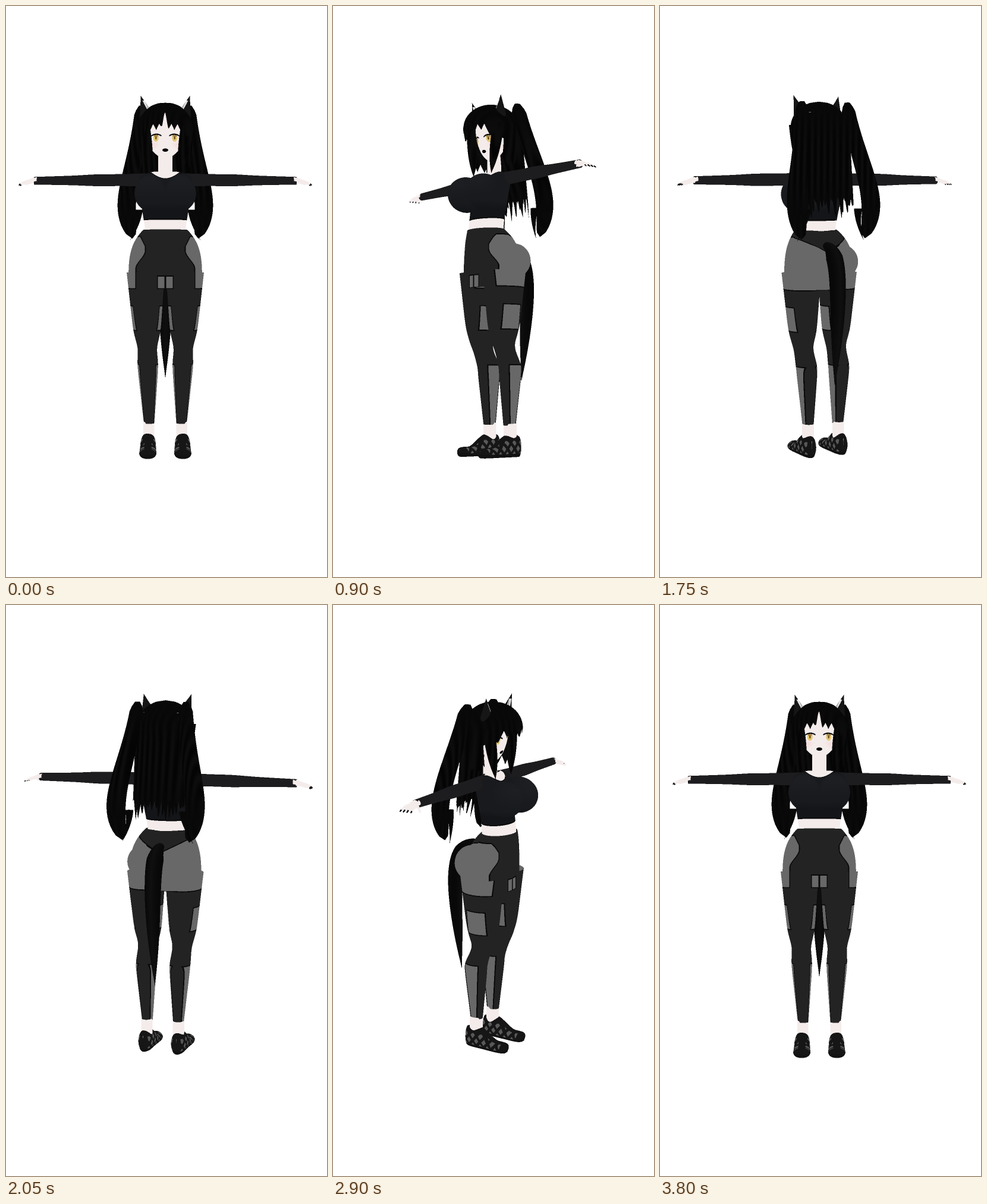
Recreate the animation shown at these times as an HTML page with a canvas. Size 540 by 960 pixels, loop 4150 ms.

```html
<!DOCTYPE html>
<html lang="en">
<head>
<meta charset="utf-8">
<title>Turntable</title>
<style>
html, body { margin: 0; width: 100%; height: 100%; overflow: hidden; background: #fff; }
canvas { display: block; width: 540px; height: 960px; }
</style>
</head>
<body>
<canvas id="stage" width="540" height="960"></canvas>
<script>
const LOOP = 4150, STEP = 60, LAST = 63;
const SS = 2, TOP = 140, W = 540 * SS, H = 630 * SS;
const PIVOT_X = 268, PIVOT_Y = 455, CAMERA = 2100, SIDES = 28;

// ---------- helpers ----------
const { abs, min, max, floor, sin, cos, sqrt, exp, hypot, PI } = Math;
const rgb = (r, g, b) => (255 << 24 | b << 16 | g << 8 | r) >>> 0;
const grey = v => rgb(v, v, v);
const mix = (a, b, t) => a + (b - a) * t;
const clamp01 = v => max(0, min(1, v));
const smooth = v => { const t = clamp01(v); return t * t * (3 - 2 * t); };
const bump = (t, centre, width) => exp(-(((t - centre) / width) ** 2));
const band = (v, lo, hi) => min(v - lo, hi - v);
const zigzag = (v, period) => abs(((v / period) % 1 + 1) % 1 * 2 - 1);

// ---------- model: shape(t) gives [x, y, z, radiusA, radiusB] for t from 0 to 1 ----------
const parts = [];
const RINGS = {
  y: [[1, 0, 0], [0, 0, 1]],
  x: [[0, 1, 0], [0, 0, 1]],
  z: [[1, 0, 0], [0, 1, 0]]
};

// Ring plane that follows a curve lying in the y-z plane.
function bentRing(shape, t) {
  const p = shape(max(0, t - .02)), q = shape(min(1, t + .02));
  const dy = q[1] - p[1], dz = q[2] - p[2], len = hypot(dy, dz);
  return [[1, 0, 0], [0, -dz / len, dy / len]];
}

function tube(axis, shape, paint, { side = 1, floorY = 999, steps = 30 } = {}) {
  const mesh = [];
  for (let i = 0; i <= steps; i++) {
    const t = i / steps, [x, y, z, ra, rb] = shape(t);
    const [A, B] = RINGS[axis] || bentRing(shape, t);
    for (let j = 0; j <= SIDES; j++) {
      const a = j / SIDES * 2 * PI, u = max(.3, ra) * cos(a), v = max(.3, rb) * sin(a);
      mesh.push(side * (x + A[0] * u + B[0] * v), min(floorY, y + A[1] * u + B[1] * v), z + A[2] * u + B[2] * v);
    }
  }
  parts.push({ mesh: Float32Array.from(mesh), steps, paint });
}

function pair(axis, shape, paint, options = {}) {
  for (const side of [-1, 1]) tube(axis, shape, paint, { ...options, side });
}

const ball = (x, y, z, rx, ry, rz) => t =>
  [x, y - ry * cos(t * PI), z, rx * sin(t * PI), rz * sin(t * PI)];

// ---------- surfaces ----------
const SKIN = rgb(244, 236, 235), BLACK = grey(10), PANEL = grey(104), LEGGING = grey(35);
const skin = () => SKIN;
const sleeve = () => rgb(29, 29, 32);
const finger = x => abs(x) > 243.5 ? grey(15) : SKIN;

const hair = (x, y, z) => grey(floor(9 + 5 * sin(x * .55 + z * .3) * sin(y * .018)));
const tailFur = x => grey(floor(8 + 8 * clamp01(1 - abs(x) / 12)));

const fringe = x => 214 - 20 * bump(x, -1, 4) - 10 * zigzag(x, 10) + 14 * clamp01((abs(x) - 30) / 8);

function cap(x, y, z) {
  if (z > 10 && y > fringe(x)) return 0;
  if (y > 258 + 14 * zigzag(z, 14)) return 0;
  return hair(x, y, z);
}

const backHair = (x, y, z) => y > 322 + 34 * zigzag(x + 3, 13) * abs(sin(x * .3)) ? 0 : hair(x, y, z);

function face(x, y, z) {
  const ax = abs(x), ex = ax - 15.5, lid = 218 + ex * ex * .035;
  if (z < -10) return SKIN;
  if (hypot(x / 5, (y - 244) / 2.6) < 1) return grey(8);
  if (abs(ex) < 9 && abs(y - lid) < 1.1) return grey(14);
  if (y > lid && hypot(ex / 4.3, (y - 224) / 6) < 1) {
    if (hypot(ex / 1.4, (y - 224) / 2.5) < 1) return rgb(110, 84, 36);
    return y < 222 ? rgb(176, 138, 66) : rgb(230, 198, 112);
  }
  const blush = 16 * clamp01(1 - hypot((ax - 20) / 11, (y - 235) / 7));
  return rgb(244, floor(236 - blush), floor(235 - blush));
}

function ear(x, y, z) {
  const ax = abs(x), rim = 39 - (y - 160) * .55;
  if (z < 11 || min(band(y, 161, 190), band(ax, rim - 10, rim)) < 0) return grey(22);
  return grey(floor(205 + 35 * sin(ax * 1.3 + y * .5)));
}

const cloth = (x, y, z) => {
  const v = floor(25 + 5 * clamp01((z - 20) / 40) * clamp01((330 - y) / 30) - 5 * clamp01((y - 335) / 12));
  return rgb(v, v + 1, v + 4);
};

function torso(x, y, z) {
  const collar = z > 0 ? max(280, 291 - x * x * .02) : 278;
  if (y < collar || y > 361) return SKIN;
  if (y > 359 || y < collar + 1) return BLACK;
  return cloth(x, y, z);
}

// Each panel is a signed distance, so one rule draws its fill and its seam.
function leggings(x, y, z) {
  const ax = abs(x), slim = (y - 603) * .08;
  const front = 33 + 16 * smooth((y - 412) / 30) + max(0, 405 - y) * .5;
  const hip = min(475 - y, z > 0 ? min(ax - front, y - 388) : y - 412 + ax * .5);
  const gusset = z > 0 ? min(band(y, 454, 475), band(ax, .5, 13)) : -9;
  const thigh = min(band(y, 504, 545), band(z, -18, 18));
  const calf = min(band(y, 603, 704), band(z, slim - 30, -2 - slim));
  const d = max(hip, gusset, thigh, calf);
  return d > .9 ? PANEL : d > -.9 ? BLACK : LEGGING;
}

function shoe(x, y, z) {
  if (y > 749) return grey(18);
  const side = abs(abs(x) - 29) > 6 && z > -32 && z < 38 && y > 728;
  const weave = zigzag(z + y * .8, 15) > .45 && zigzag(z - y * .8, 15) > .4;
  return grey(side && weave ? 88 : 22);
}

// ---------- body ----------
tube('y', t => [0, mix(240, 290, t), -4, 12, 12], skin);
tube('y', t => {
  const round = sqrt(clamp01(t * 9 + .2));
  return [0, mix(279, 380, t), 13 * smooth(t), mix(49, 33, t) * round, mix(17, 27, t) * round];
}, torso);
pair('y', ball(25, 317, 36, 26, 30, 34), cloth);
tube('y', t => {
  const waist = (1 - t) ** 4;
  return [0, mix(377, 475, t), 14 * waist, 62 - 25 * waist, 39 - 12 * waist];
}, leggings);
pair('y', ball(28, 429, -24, 30, 29, 27), leggings);
pair('y', t => [mix(33, 27.5, t), mix(448, 703, t), -15 * smooth((t - .45) / .2),
  mix(32, 9, t) - 4 * bump(t, .5, .08), mix(38, 11, t) - 6 * bump(t, .5, .1)], leggings, { steps: 50 });
pair('y', t => [28, mix(700, 732, t), -16, 9.5, 11.5], skin);
pair('z', t => {
  const round = sqrt(1 - (2 * t - 1) ** 8), lift = mix(20.5, 9, smooth((t - .3) / .45));
  return [29, 755 - lift * .8, mix(-35, 47, t), mix(12, 15, t) * round, lift * mix(.6, 1, round)];
}, shoe, { floorY: 755 });

// ---------- arms and hands ----------
pair('x', t => {
  const r = mix(11, 6.5, t) + bump(t, .45, .15);
  return [mix(28, 221, t), 292 + 1.5 * t, -4, r, r + 1 - t];
}, sleeve);
pair('x', t => [mix(216, 238, t), mix(292.5, 298, t * t), -4, mix(5.5, 2, t), mix(7, 9, t)], skin);
for (let i = 0; i < 4; i++) {
  const spread = i * 5 - 11;
  pair('x', t => [mix(230, 247 - abs(i - 1.5), t), 295 + 6 * t * t, spread * (1 + .3 * t), 2.4 - 1.5 * t, 2.6 - 1.5 * t],
    finger, { steps: 10 });
}
pair('x', t => [mix(221, 234, t), mix(295, 301, t), 14 * t, 2.4 - t, 3 - 1.8 * t], skin, { steps: 10 });

// ---------- head ----------
tube('y', t => {
  const jaw = (1 - t ** 3.2) ** .8;
  return [0, mix(182, 259, t), -6 + 13 * t ** 4, 37 * jaw, 32 * jaw];
}, face);
tube('y', t => {
  const dome = t < .4 ? sqrt(1 - (1 - t / .4) ** 2) : 1;
  return [0, mix(163, 276, t), 2 - 6 * t * t, 48 * dome - 6 * t * t, 51 * dome - 11 * t * t];
}, cap, { steps: 50 });
tube('y', t => [0, mix(195, 358, t), mix(-20, -44, t), 44, mix(25, 11, t)], backHair);
pair('y', t => [mix(37, 25, t), mix(202, 284, t), mix(15, 21, t), 11 * (1 - t ** 3), 9 * (1 - t ** 3)], hair);
pair('y', t => {
  const taper = sqrt(1 - t ** 6) * min(1, .4 + t * 12);
  return [41 + 16 * t + 14 * sin(PI * t * t), mix(165, 389, t), -22 - 38 * sin(PI * .62 * t ** 1.2),
    mix(10, 20, t) * taper, mix(13, 16, t) * taper];
}, hair);
pair('y', t => [46 + 14 * t * t, mix(340, 392, t), -54 + 8 * t, 7 * (1 - t), 6 * (1 - t)], hair);
pair('y', t => [mix(41, 28, t), mix(153, 191, t), mix(13, 6, t), 15 * t, 11 * t], ear);

// ---------- tail ----------
tube('bent', t => {
  const r = 14 * min(1, .5 + 2.5 * t) * (1 - t ** 4);
  return [0, 402 + 227 * t ** 1.6, -30 - 52 * (1 - (1 - t) ** 4) + 20 * t * t, r, r * .93];
}, tailFur);

// ---------- renderer ----------
const stage = document.getElementById('stage').getContext('2d');
const buffer = document.createElement('canvas');
buffer.width = W;
buffer.height = H;
const ink = buffer.getContext('2d');
const image = ink.createImageData(W, H);
const pixels = new Uint32Array(image.data.buffer);
const depth = new Float32Array(W * H);

function project(mesh, yaw, tilt) {
  const out = new Float32Array(mesh.length);
  const cy = cos(yaw), sy = sin(yaw), ct = sqrt(1 - tilt * tilt);
  for (let i = 0; i < mesh.length; i += 3) {
    const y = mesh[i + 1] - PIVOT_Y;
    const x = mesh[i] * cy - mesh[i + 2] * sy;
    const z = mesh[i] * sy + mesh[i + 2] * cy;
    const near = z * ct - y * tilt, scale = CAMERA / (CAMERA - near);
    out[i] = (PIVOT_X + x * scale) * SS;
    out[i + 1] = (PIVOT_Y - TOP + (y * ct + z * tilt) * scale) * SS;
    out[i + 2] = near;
  }
  return out;
}

function triangle(m, p, paint, a, b, c) {
  const ax = p[a], ay = p[a + 1], bx = p[b], by = p[b + 1], cx = p[c], cy = p[c + 1];
  const area = (bx - ax) * (cy - ay) - (by - ay) * (cx - ax);
  if (abs(area) < 1e-6) return;
  const x0 = max(0, Math.ceil(min(ax, bx, cx) - .5)), x1 = min(W - 1, floor(max(ax, bx, cx) - .5));
  const y0 = max(0, Math.ceil(min(ay, by, cy) - .5)), y1 = min(H - 1, floor(max(ay, by, cy) - .5));
  for (let y = y0; y <= y1; y++) {
    for (let x = x0; x <= x1; x++) {
      const qx = x + .5, qy = y + .5;
      const u = ((bx - qx) * (cy - qy) - (by - qy) * (cx - qx)) / area;
      const v = ((cx - qx) * (ay - qy) - (cy - qy) * (ax - qx)) / area;
      const w = 1 - u - v;
      if (min(u, v, w) < -1e-4) continue;
      const z = u * p[a + 2] + v * p[b + 2] + w * p[c + 2], k = y * W + x;
      if (z <= depth[k]) continue;
      const color = paint(u * m[a] + v * m[b] + w * m[c],
        u * m[a + 1] + v * m[b + 1] + w * m[c + 1],
        u * m[a + 2] + v * m[b + 2] + w * m[c + 2]);
      if (!color) continue;
      depth[k] = z;
      pixels[k] = color;
    }
  }
}

function render(yaw, tilt) {
  pixels.fill(0xffffffff);
  depth.fill(-1e6);
  const ring = (SIDES + 1) * 3;
  for (const { mesh, steps, paint } of parts) {
    const p = project(mesh, yaw, tilt);
    for (let i = 0; i < steps; i++) {
      for (let j = 0; j < SIDES; j++) {
        const a = i * ring + j * 3, b = a + 3, c = a + ring, d = c + 3;
        triangle(mesh, p, paint, a, b, c);
        triangle(mesh, p, paint, b, d, c);
      }
    }
  }
  ink.putImageData(image, 0, 0);
  stage.fillStyle = '#fff';
  stage.fillRect(0, 0, 540, 960);
  stage.drawImage(buffer, 0, TOP, W / SS, H / SS);
}

// ---------- motion: one eased turn while the camera sways below, then above ----------
let shown = -1;

function tick() {
  const t = performance.now() % LOOP;
  const step = max(1, min(LAST, floor(floor(t / 50) * 50 / STEP)));
  if (step !== shown) {
    shown = step;
    const u = (step - 1) / (LAST - 1), wave = sin(2 * PI * u);
    render(2 * PI * smooth(u) + .11 * wave, .13 * sin(PI * u) - .17 * wave);
  }
  requestAnimationFrame(tick);
}
tick();
</script>
</body>
</html>
```
